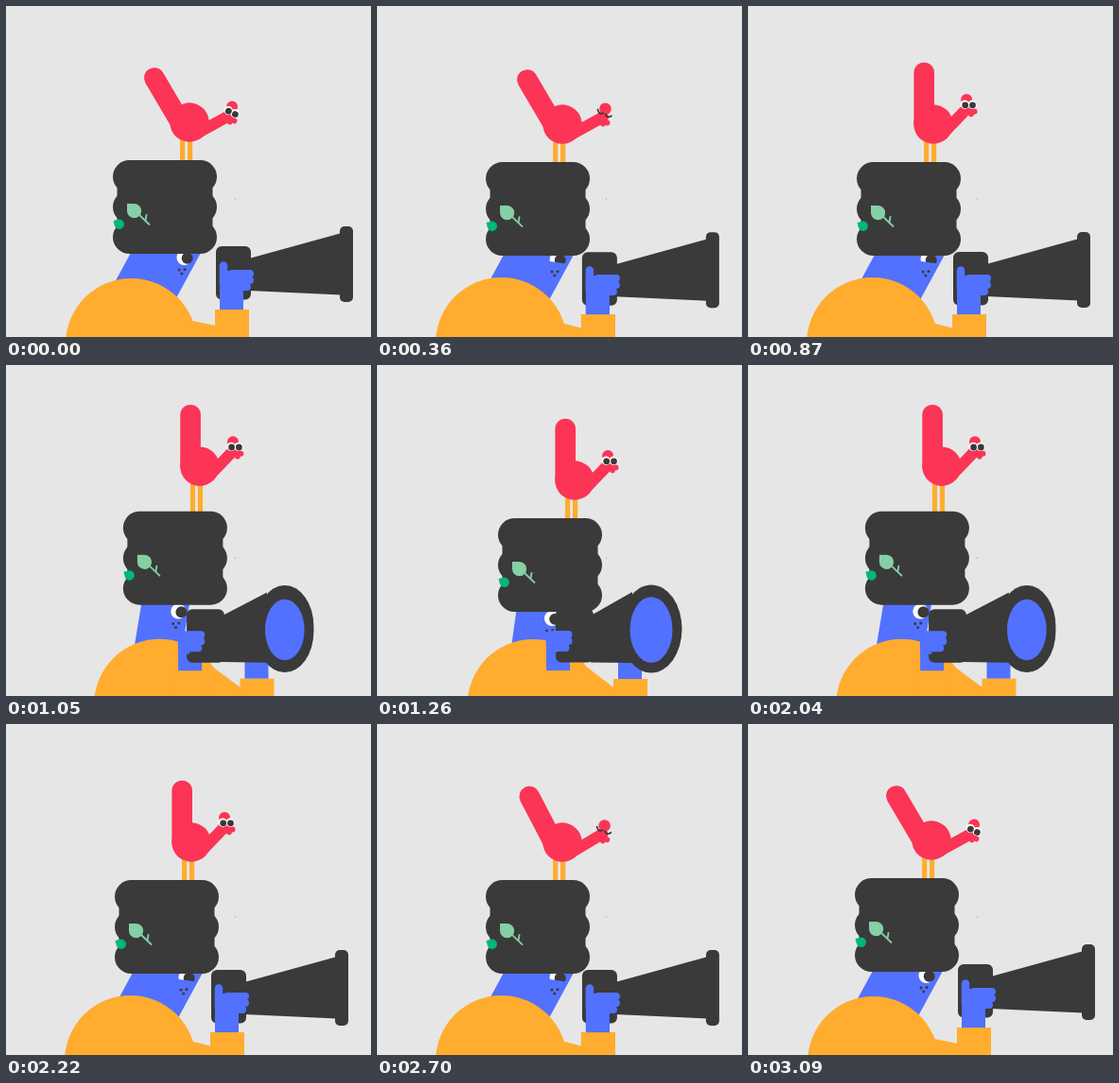
An HTML page that plays this animation: 386x350 px, repeating every 3120 ms.

```html
<!DOCTYPE html>
<html lang="en">
<head>
<meta charset="utf-8">
<title>Megaphone and bird</title>
<style>
html, body { margin: 0; width: 100%; height: 100%; overflow: hidden; background: #e6e6e6; }
svg { display: block; width: 100vw; height: 100vh; }
</style>
</head>
<body>
<svg id="stage" viewBox="0 0 386 350"></svg>
<script>
const INK = '#3a3a3a', BLUE = '#5271ff', GOLD = '#ffac2f', RED = '#fc3455', WHITE = '#fff';
const LOOP = 3120, STEP = 30, PEAK = 1260, HOLD_END = 1860;
const stage = document.getElementById('stage');

const mix = (a, b, q) => a + (b - a) * q;
const progress = (t, from, to) => Math.min(1, Math.max(0, (t - from) / (to - from)));
const ease = (t, from, to) => {
  const u = progress(t, from, to);
  return u * u * (3 - 2 * u);
};
const bump = (t, from, to) => Math.sin(Math.PI * progress(t, from, to)) ** 2;

const circle = (x, y, r, fill) => `<circle cx="${x}" cy="${y}" r="${r}" fill="${fill}"/>`;
const rect = (x, y, w, h, fill, rx = 0, ry = rx) =>
  `<rect x="${x}" y="${y}" width="${w}" height="${h}" rx="${rx}" ry="${ry}" fill="${fill}"/>`;
const line = (d, color, width) =>
  `<path d="${d}" fill="none" stroke="${color}" stroke-width="${width}" stroke-linecap="round"/>`;
const group = (x, y, content, extra = '') =>
  `<g transform="translate(${x} ${y}) ${extra}">${content}</g>`;
const turned = (x, y, angle, content) => group(x, y, content, `rotate(${angle})`);
// A four-sided shape with upright left and right sides.
const wedge = (x0, top0, bottom0, x1, top1, bottom1, fill) =>
  `<path d="M${x0} ${top0}L${x1} ${top1}V${bottom1}L${x0} ${bottom0}Z" fill="${fill}"/>`;
const leaf = (x, y, scale, angle, fill) => group(x, y,
  `<path d="M0 0H8A7.6 7.6 0 1 1 0 8Z" fill="${fill}"/>`, `rotate(${angle}) scale(${scale})`);

function birdHead(blink) {
  const base = circle(0, 4, 6, RED) + circle(7, 7.5, 3, RED) + circle(3.5, 10.5, 2.8, RED);
  if (blink) {
    return base + circle(-1, -5, 6.3, RED) +
      line('M-8 -1Q-4.5 4 -1 0M1.5 0Q5 4 8 -1', INK, 1.7);
  }
  const eyes = [-3.2, 4.6];
  return base + circle(-1.4, -5, 6, RED) +
    eyes.map(x => circle(x, .2, 4.7, WHITE)).join('') +
    eyes.map(x => circle(x + .4, .8, 3.4, INK)).join('');
}

function bird(droop, blink, lift) {
  const legs = [-10, -2].map(x => rect(x, 15, 5.2, 26 - lift, GOLD)).join('');
  const tail = turned(-9.8, -.5, -30.5 * droop, line('M0 0V-54', RED, 21.6));
  const reach = 4 * droop;
  const neck = line(`M10 10L${36 + reach} -17`, RED, 12);
  const head = turned(36.5 + reach, -21, 12 * droop, birdHead(blink));
  return group(196, 125 + lift,
    legs + tail + circle(0, 0, 20.7, RED) + turned(0, 0, 13 * droop, neck + head));
}

function hair() {
  const rolls = [0, 1, 2].map(i => rect(115, 165 + 32 * i, 110, 35, INK, 17.5)).join('');
  return rolls + rect(119.5, 180, 101, 66, INK) +
    line('M142 222L153.5 233M149.5 229L150.5 223', '#86d0a5', 1.8) +
    leaf(130, 211, 1, 0, '#86d0a5') + leaf(115.5, 229, .68, -14, '#00b67f');
}

function face(turn, lid) {
  const skin = group(134.5, 262, rect(0, 0, mix(74, 49, turn), 64, BLUE),
    `skewX(${-mix(28.5, 8, turn)})`);
  const eyelid = turned(0, 0, 8, rect(-9, mix(9, 3, lid), 19, 6 * lid, BLUE));
  const freckles = circle(-5.5, 13, 1.5, INK) + circle(.5, 12.6, 1.5, INK) + circle(-2.7, 17, 1.5, INK);
  const eye = circle(0, 0, 8, WHITE) + circle(3.2, .8, 6, INK) + eyelid + freckles;
  return skin + group(mix(190.5, 172, turn), mix(268, 271, turn), eye);
}

function hair_and_bird(droop, blink, lift) {
  return bird(droop, blink, lift) + hair();
}

const forearm = () => rect(216, 326, 36, 40, GOLD) + rect(221, 286, 25, 40, BLUE);

function hand(turn) {
  const tip = mix(253, 244.5, turn);
  const fingers = [0, 1, 2].map(i =>
    line(`M${mix(234, 228, turn)} ${288 + 7 * i}H${i < 2 ? tip : tip - 3}`, BLUE, 8)).join('');
  return rect(221, 285, mix(25, 11, turn), mix(40, 22, turn), BLUE) +
    line(`M225 ${mix(279.5, 289, turn)}V300`, BLUE, 8.5) + fingers;
}

function megaphone(turn) {
  const at = (a, b) => mix(a, b, turn);
  const cx = at(355, 290), cy = 279, rx = at(7, 32.5), ry = at(40, 46.5);
  return rect(at(217, 189), at(260, 258), at(37, 40), 56.5, INK, 6) +
    wedge(at(252, 226), at(273, 265), at(307, 314.5),
      at(350, 270), at(246, 240), at(311.5, 315), INK) +
    rect(cx - rx, cy - ry, rx * 2, ry * 2, INK, at(5, 32.5), at(5, 46.5)) +
    `<ellipse cx="${cx}" cy="${cy + 1}" rx="${22.5 * turn}" ry="${34.8 * turn}" fill="${BLUE}"/>`;
}

function body(turn, opening) {
  const shoulderX = mix(195, 215, turn), shoulderY = mix(335, 314, turn) - 2.5 * opening;
  return circle(mix(131.5, 165, turn) + opening, mix(356.5, 359.5, turn) + opening, 69.5, GOLD) +
    wedge(shoulderX, shoulderY, 352,
      mix(222, 254, turn) + 5 * opening, mix(342, 344, turn) - 3 * opening, 352, GOLD);
}

function draw(t) {
  const opening = Math.exp(-t / 100) * Math.cos(t / 100);
  const turn = ease(t, 900, 1080);
  const hop = bump(t, 930, 1215);
  const droop = 1 - ease(t, 360, 515) + .8 * bump(t, 1080, 1260);
  const lid = ease(t, 0, 180) - ease(t, 900, 1050);
  const blink = [405, 1185].some(middle => Math.abs(t - middle) <= 60);
  const headX = 13 * ease(t, 900, 1140) - 2 * opening;
  const headY = -3 * turn - 8 * hop - 2 * opening;
  const armX = 5 * opening, armY = -5 * opening;
  const nearX = armX - 42 * turn, nearY = armY - 3 * turn;

  stage.innerHTML = rect(0, 0, 386, 350, '#e6e6e6') + circle(242.5, 204, .6, '#888') +
    group(headX, headY, face(turn, lid) + hair_and_bird(droop, blink, -8 * hop)) +
    body(turn, opening) +
    group(armX + 34 * turn, armY + 6 * turn, forearm()) +
    group(nearX, nearY, forearm()) +
    group(5 * opening, -6 * opening, megaphone(turn)) +
    group(nearX, nearY, hand(turn));
}

// The clip plays forward, rests on its last pose, then runs backward.
const start = performance.now();
function tick() {
  const now = (performance.now() - start) % LOOP;
  const t = Math.floor(now / STEP) * STEP;
  draw(t < HOLD_END ? Math.min(t, PEAK) : LOOP - STEP - t);
  requestAnimationFrame(tick);
}
tick();
</script>
</body>
</html>
```
